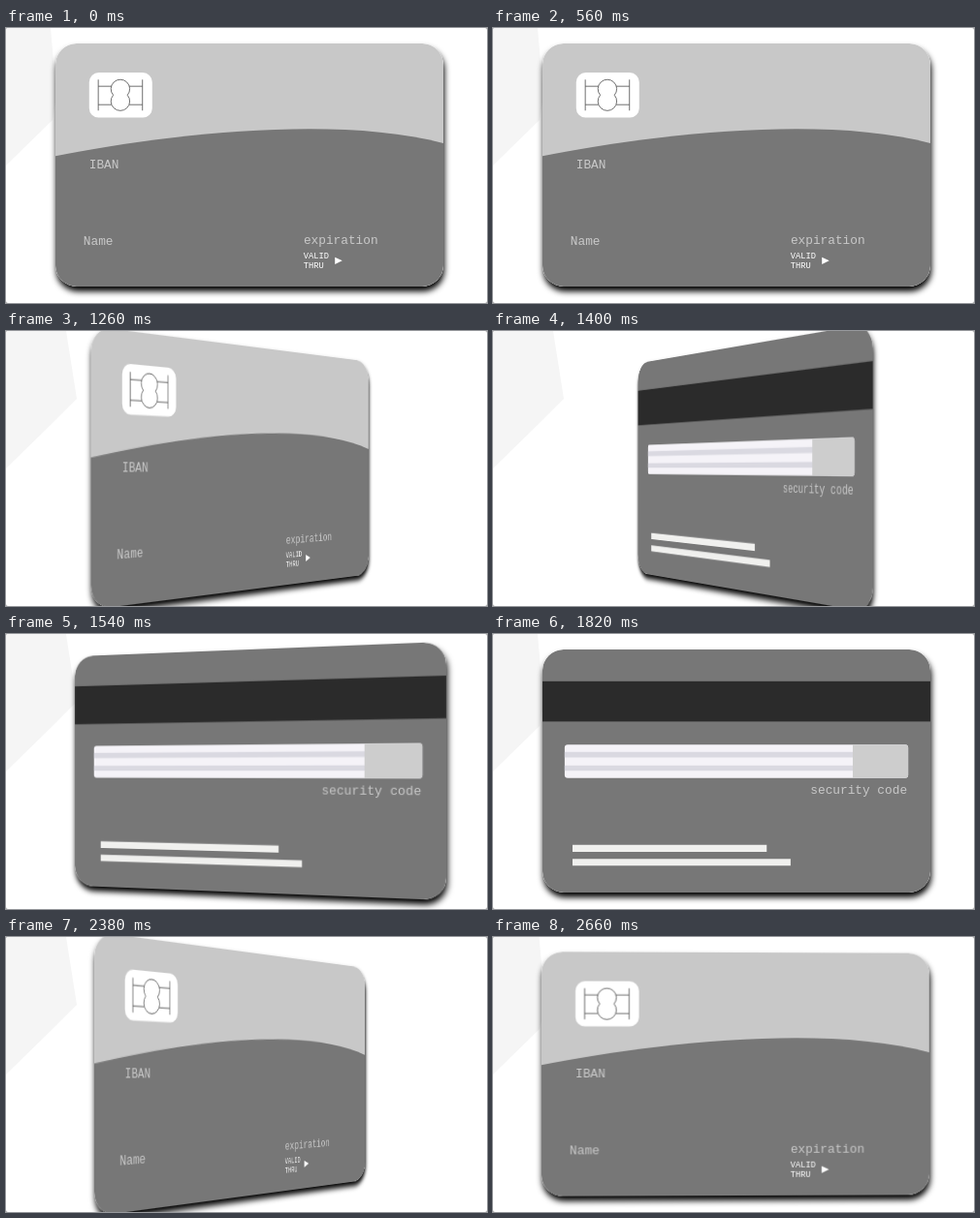
These frames come from a looping animation (496 by 284 pixels, 2730 ms). An HTML page:

```html
<!DOCTYPE html>
<html lang="en">
<head>
<meta charset="utf-8">
<title>Card flip</title>
<style>
  html, body { margin: 0; width: 100%; height: 100%; overflow: hidden; background: #999; }
  #stage { position: relative; width: 496px; height: 284px; overflow: hidden; background: #fff; border-radius: 2px; }
  #backdrop { position: absolute; inset: 0; }
  #scene { position: absolute; left: 51px; top: 16px; width: 400px; height: 251px; perspective: 1000px; }
  #card { width: 100%; height: 100%; transform-style: preserve-3d; }
  .face {
    position: absolute; inset: 0; width: 400px; height: 251px;
    border-radius: 22px; box-shadow: 1px 5px 6px 0 #000;
    backface-visibility: hidden;
  }
  .back { transform: rotateY(180deg); }
  .light { fill: #c8c8c8; }
  .dark { fill: #777; }
  text { font-family: "Liberation Mono", "Courier New", monospace; fill: #fff; }
  .label { font-size: 24px; opacity: .6; }
  .small { font-size: 16.4px; }
  .chip { fill: none; stroke: #4c4c4c; stroke-width: 1.5; }
</style>
</head>
<body>
<div id="stage">
  <svg id="backdrop" width="496" height="284"><polygon id="patch" fill="#f5f5f5"/></svg>
  <div id="scene">
    <div id="card">
      <svg class="face front" viewBox="0 0 750 471" preserveAspectRatio="none">
        <rect class="light" width="750" height="471" rx="40"/>
        <path class="dark" d="M750 431V193.2C532.4 135.7 193.6 179.7 0 218.1V431a40 40 0 0 0 40 40H710a40 40 0 0 0 40-40z"/>
        <rect x="65.2" y="56.4" width="121.9" height="87.2" rx="18.5" fill="#fff"/>
        <path class="chip" d="M82.8 70v60M168.2 70v60M82.8 82.9h25.4M82.8 118.6h25.4M142.8 82.9h25.4M142.8 118.6h25.4
          M111.7 100a18.2 18.2 0 1 1 27.5 0a18.2 18.2 0 1 1-27.5 0z"/>
        <text class="label" x="65.1" y="241.5">IBAN</text>
        <text class="label" x="54.1" y="389.9">Name</text>
        <text class="label" x="479.8" y="388.9">expiration</text>
        <text class="small" x="479.4" y="417">VALID</text>
        <text class="small" x="479.4" y="435.7">THRU</text>
        <polygon points="554.5,421 540.4,414.2 540.4,427.9" fill="#fff"/>
      </svg>
      <svg class="face back" viewBox="0 0 750 471" preserveAspectRatio="none">
        <rect class="dark" width="750" height="471" rx="40"/>
        <rect y="61.6" width="750" height="78" fill="#2b2b2b"/>
        <rect x="42.9" y="184.6" width="664.2" height="64.5" rx="6" fill="#f5f3f8"/>
        <path d="M42.9 198.6h600v10.5h-600zM42.9 224.5h600V235h-600z" fill="#dad9e1"/>
        <path d="M600 184.6h101.1a6 6 0 0 1 6 6v52.5a6 6 0 0 1-6 6H600z" fill="#cdcdcd"/>
        <text class="label" x="518.1" y="280.1">security code</text>
        <path d="M58.1 378.6h375.5v13.5H58.1zM58.1 405.6h421.7v13.5H58.1z" fill="#f0f0ee"/>
      </svg>
    </div>
  </div>
</div>
<script>
  const LOOP = 2730;
  const card = document.getElementById('card');
  const patch = document.getElementById('patch');

  // Cubic Bezier easing, solved by bisection.
  function bezier(x1, y1, x2, y2) {
    const curve = (s, a, b) => 3 * (1 - s) ** 2 * s * a + 3 * (1 - s) * s * s * b + s ** 3;
    return x => {
      if (x <= 0) return 0;
      if (x >= 1) return 1;
      let low = 0, high = 1;
      for (let i = 0; i < 24; i++) {
        const mid = (low + high) / 2;
        if (curve(mid, x1, x2) < x) low = mid; else high = mid;
      }
      return curve(low, y1, y2);
    };
  }

  const turnOver = bezier(.46, 0, .2, 1);
  const turnBack = bezier(.25, .1, .25, 1);

  function draw(now) {
    const t = now % LOOP;
    const angle = 180 * (turnOver((t - 1040) / 780) - turnBack((t - 2093) / 650));
    card.style.transform = `rotateY(${angle}deg)`;

    // The pale backdrop widens while the card is turned.
    const open = Math.min(1, 3.3 * Math.abs(Math.sin(angle * Math.PI / 180)));
    patch.setAttribute('points', `0,0 ${46 + 16 * open},0 ${52 + 21 * open},70 48,95 0,142`);
  }

  const start = performance.now();
  function tick() {
    draw(performance.now() - start);
    requestAnimationFrame(tick);
  }
  tick();
</script>
</body>
</html>
```
